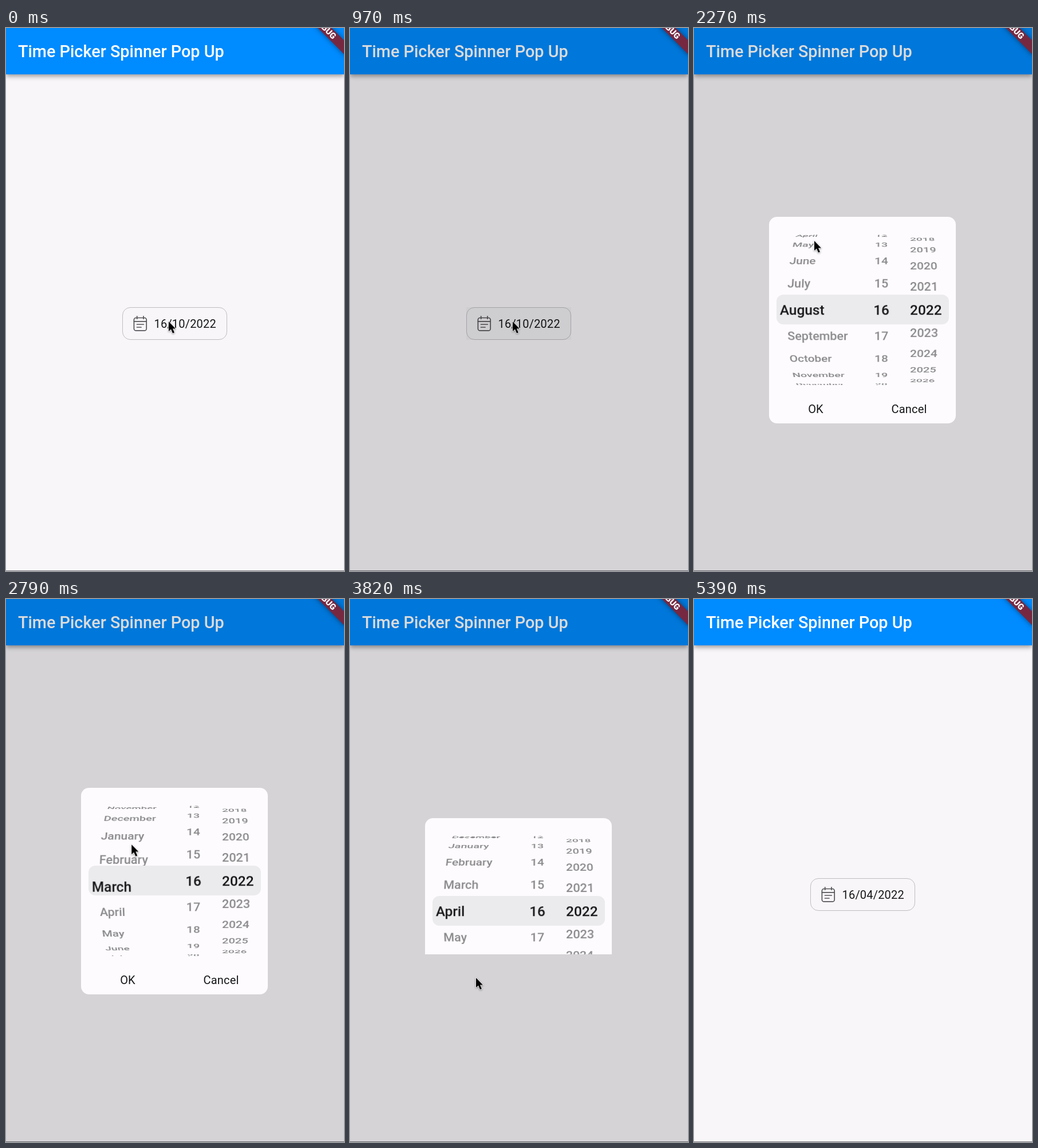
Recreate the animation shown at these times as an HTML page. Size 590 px wide and 949 px high, loop 5.48 s.

```html
<!DOCTYPE html>
<html lang="en">
<head>
<meta charset="utf-8">
<title>Date picker</title>
<style>
html, body { margin: 0; width: 100%; height: 100%; overflow: hidden; }
body { position: relative; background: #f8f6f9; color: #161618; font: 20px Roboto, sans-serif; }
div, svg { position: absolute; box-sizing: border-box; white-space: pre; }
#bar {
  left: 0; top: 0; width: 590px; height: 80.5px; background: #008bfe; color: #fff;
  font: 500 28.8px/83px Roboto, sans-serif; padding-left: 21px;
  box-shadow: 0 3px 6px -1px #0003, 0 5px 7px #00000024, 0 1px 14px #0000001f;
}
#edge { left: 0; top: 948px; width: 590px; height: 1px; background: #77767a; }
#field, #ink { left: 203px; top: 488px; width: 182.5px; height: 57px; }
#field { border: 1px solid #bebdc1; border-radius: 14px; }
#ink { background: #000; }
#date { left: 258.5px; top: 502px; line-height: 30px; letter-spacing: .2px; }
#icon { left: 220px; top: 500px; fill: none; stroke: #555458; stroke-width: 1.7; stroke-linecap: round; }
#shade { inset: 0; background: #00000024; }
#popup { left: 131px; width: 326px; overflow: hidden; }
#card { width: 326px; height: 361px; background: #fdfbfe; border-radius: 14px; overflow: hidden; }
#band { left: 13px; top: 136px; width: 301px; height: 52px; border-radius: 12px; background: #ebeaec; }
.wheel { inset: 0; font: 500 21.8px/46px Roboto, sans-serif; }
.far { opacity: .5; clip-path: inset(31px 0 67px); }
.near { clip-path: inset(136px 0 173px); }
.wheel div { top: 139.5px; height: 46px; width: 130px; }
.action { top: 321px; width: 163px; line-height: 30px; text-align: center; letter-spacing: .2px; }
#banner {
  left: 498px; top: -8px; width: 118px; height: 17px; transform: rotate(45deg);
  background: #762841; color: #fff; box-shadow: 0 0 8px #00000080;
  font: 900 14.6px/17px Roboto, sans-serif; text-align: center;
}
#cursor { left: 0; top: 0; overflow: visible; filter: drop-shadow(0 1.5px 1.5px #0006); }
</style>
</head>
<body>
<div id="bar">Time Picker Spinner Pop Up</div>
<div id="edge"></div>
<div id="ink"></div>
<div id="field"></div>
<svg id="icon" width="30" height="32">
  <rect x="3.4" y="6.5" width="21.8" height="22.4" rx="3.5"/>
  <path d="M3.4 12.8H25.2M8.7 3.8V8.2M20 3.8V8.2M8.5 18H20.3M8.5 23H16"/>
</svg>
<div id="date"></div>
<div id="shade"></div>
<div id="popup"><div id="card">
  <div id="band"></div>
  <div class="action" style="left:0">OK</div>
  <div class="action" style="left:163px">Cancel</div>
</div></div>
<div id="banner">DEBUG</div>
<svg id="cursor" width="20" height="30">
  <path d="M0 1V18L4 14.5L7 21.5L10 20.2L7 13.4H12Z" stroke="#fff" stroke-width="1.5" stroke-linejoin="round" paint-order="stroke"/>
</svg>
<script>
const LOOP = 5480, RADIUS = 174, DEPTH = 501;
const $ = id => document.getElementById(id);
const ramp = (t, from, to) => Math.min(1, Math.max(0, (t - from) / (to - from)));
const ease = (t, from, to) => {
  const u = ramp(t, from, to);
  return u * u * (3 - 2 * u);
};

// Stops of the pointer: time, x, y.
const stops = [
  [1150, 284, 512], [1520, 225, 525], [1730, 218, 440], [1970, 214, 530], [2270, 210, 371],
  [2560, 222, 590], [2930, 218, 353], [3350, 220, 661], [3980, 220, 661], [4480, 116, 655],
  [4680, 42, 94]
];
function pointer(t) {
  let [last, x, y] = stops[0];
  for (const [time, toX, toY] of stops) {
    const e = ease(t, last, time);
    x += (toX - x) * e;
    y += (toY - y) * e;
    last = time;
  }
  return [x, y];
}

// A drum of labels turning about `axis`; the centre row is magnified.
function makeWheel(axis, left, align, step, label) {
  const reach = 77 / step;
  const layers = ["far", "near"].map(kind => {
    const layer = document.createElement("div");
    layer.className = "wheel " + kind;
    for (let i = 0; i < 11; i++) {
      const row = layer.appendChild(document.createElement("div"));
      row.style.cssText = `left:${left}px;text-align:${align};transform-origin:${axis - left}px 50%`;
    }
    // The band hides the far layer behind it.
    if (kind === "far") $("band").before(layer);
    else $("card").append(layer);
    return [...layer.children];
  });
  return value => layers.forEach((rows, near) => rows.forEach((row, i) => {
    const index = Math.round(value) + i - 5, k = index - value;
    row.textContent = label(index);
    row.style.visibility = Math.abs(k) <= (near ? 1.5 : reach) ? "visible" : "hidden";
    row.style.transform = `scale(${near ? 1.12 : 1}) perspective(${DEPTH}px) translateZ(${-RADIUS}px) ` +
      `rotateX(${-k * step}deg) translateZ(${RADIUS}px)`;
  }));
}

const monthName = new Intl.DateTimeFormat("en", { month: "long" });
const turnMonth = makeWheel(132.5, 30.7, "left", 15.5, i => monthName.format(new Date(2022, i - 1)));
const turnDay = makeWheel(195.7, 130.7, "center", 15.5, String);
const turnYear = makeWheel(246, 246, "left", 13.6, String);
turnDay(16);
turnYear(2022);

function draw(t) {
  const open = ramp(t, 980, 1110) * (1 - ramp(t, 3780, 3900));
  $("popup").style.top = Math.floor(488 - 158 * open) + "px";
  $("popup").style.height = Math.round(361 * open) + "px";
  $("shade").hidden = t < 940 || t >= 3900;
  $("ink").style.opacity = t < 1200 ? .03 * ramp(t, 850, 950) : 0;
  $("date").textContent = `16/${t < 3780 ? "10" : "04"}/2022`;
  // Two flicks back and a short correction forward.
  turnMonth(10 - 2 * ease(t, 1720, 2080) - 5.3 * ease(t, 2330, 2660) + 1.3 * ease(t, 2740, 3050));
  const [x, y] = pointer(t);
  $("cursor").style.transform = `translate(${x}px, ${y}px)`;
  $("cursor").style.visibility = t < 5050 ? "visible" : "hidden";
}

const start = performance.now();
function tick() {
  draw((performance.now() - start) % LOOP);
  requestAnimationFrame(tick);
}
tick();
</script>
</body>
</html>
```
